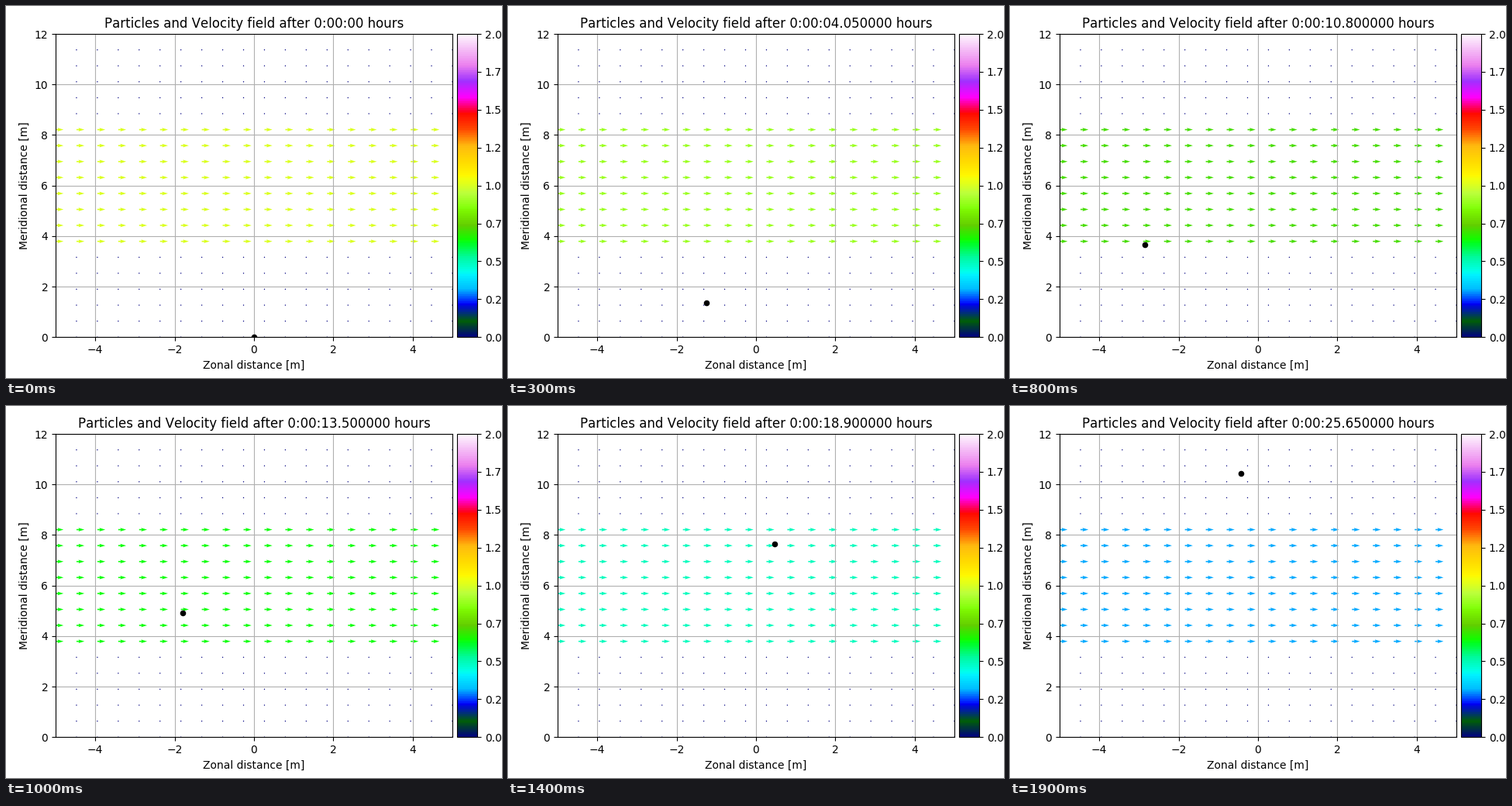
Recreate the animation shown at these times as a matplotlib script. Size 640 by 480 pixels, loop 2000 ms.

```python
import numpy as np
import matplotlib.pyplot as plt
from matplotlib.animation import FuncAnimation

FRAMES, INTERVAL = 20, 100
STEP = 1.35                 # simulated seconds per frame
FLOW_DECAY = 0.027          # loss of stream speed per second
SOFTNESS = 0.4              # seconds taken by a change of velocity

plt.rcParams["text.kerning_factor"] = 6


def bend(t, start):
    """Smooth version of max(t - start, 0)."""
    return SOFTNESS * np.logaddexp(0, (t - start) / SOFTNESS)


def swimmer(t):
    """Steady drift that bends on entering and on leaving the stream."""
    x = -0.3075 * t + 0.7274 * bend(t, 10.26) - 0.685 * bend(t, 20.2)
    y = 0.336 * t + 0.17 * bend(t, 11.28) - 0.141 * bend(t, 21.24)
    return x, y


def title(t):
    clock = f"0:00:{t:09.6f}" if t else "0:00:00"
    return f"Particles and Velocity field after {clock} hours"


fig, ax = plt.subplots(figsize=(6.4, 4.8), dpi=100)
fig.subplots_adjust(left=0.1, right=0.9, bottom=0.11, top=0.925)

gx, gy = np.meshgrid(np.linspace(-5, 5, 20), np.linspace(0, 12, 20))
stream = (abs(gy - 6) < 2.5).astype(float)
arrows = ax.quiver(gx, gy, stream, np.zeros_like(gx), stream,
                   cmap="gist_ncar", clim=(0, 2), scale=50)
dot = ax.scatter([0], [0], s=20, c="k", zorder=20)

ax.set(xlim=(-5, 5), ylim=(0, 12),
       xlabel="Zonal distance [m]", ylabel="Meridional distance [m]")
ax.grid(True)

box = ax.get_position()
bar_ax = fig.add_axes([box.x1 + 0.01, box.y0, 0.04, box.height])
fig.colorbar(arrows, cax=bar_ax)


def draw(frame):
    t = frame * STEP
    arrows.set_array((stream * (1 - FLOW_DECAY * t)).ravel())
    dot.set_offsets([swimmer(t)])
    ax.set_title(title(t))
    return arrows, dot


anim = FuncAnimation(fig, draw, frames=FRAMES, interval=INTERVAL,
                     init_func=lambda: draw(0), repeat=True, repeat_delay=0)
plt.show()
```
